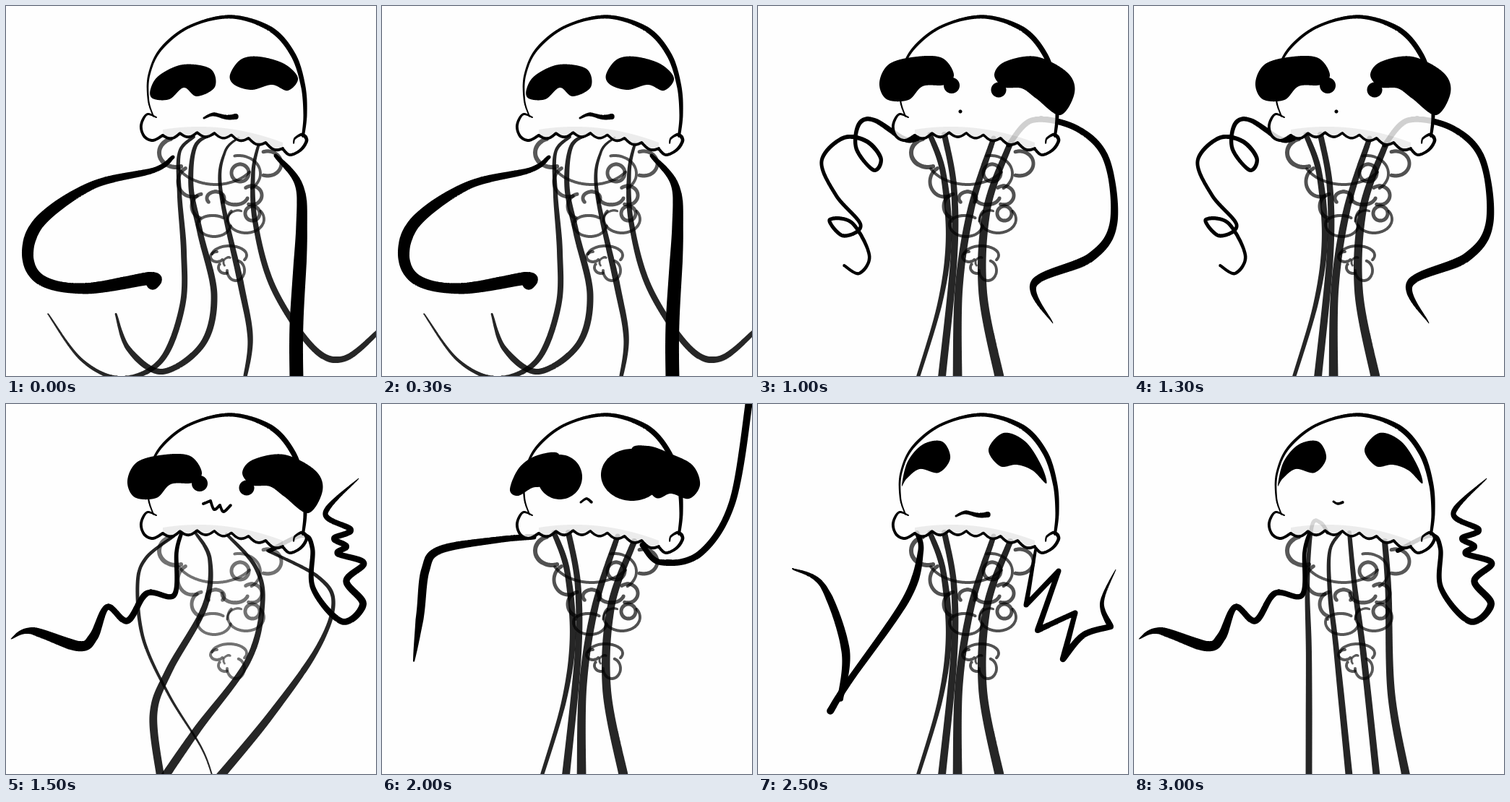
These frames come from a looping animation (512x512 px, 3.5 s). An HTML page with a canvas:

```html
<!DOCTYPE html>
<html lang="en">
<head>
<meta charset="utf-8">
<title>Dancing jellyfish</title>
<style>
html, body { margin: 0; height: 100%; overflow: hidden; background: #fefefe; }
canvas { display: block; width: 512px; height: 512px; }
</style>
</head>
<body>
<canvas id="stage" width="512" height="512"></canvas>
<script>
const ctx = document.getElementById('stage').getContext('2d');
const STEP = 500, TURN = 2 * Math.PI;

// "x,y x,y! ..." -> points; "!" marks a sharp corner
const parse = text => text.replace(/(\S+)!/g, '$1 $1').trim().split(/\s+/)
  .map(point => point.split(',').map(Number));

// Catmull-Rom curve sampled at about half a pixel
function curve(text, closed) {
  const points = parse(text), n = points.length, out = [];
  const at = i => points[closed ? (i + n) % n : Math.max(0, Math.min(n - 1, i))];
  for (let i = 0; i < (closed ? n : n - 1); i++) {
    const [a, b, c, d] = [at(i - 1), at(i), at(i + 1), at(i + 2)];
    const steps = Math.ceil(Math.hypot(c[0] - b[0], c[1] - b[1]) * 2);
    for (let s = 0; s < steps; s++) {
      const t = s / steps;
      out.push(b.map((v, k) => v + t / 2 * (c[k] - a[k] +
        t * (2 * a[k] - 5 * v + 4 * c[k] - d[k] + t * (3 * (v - c[k]) + d[k] - a[k])))));
    }
  }
  return out;
}

// Samples of f(t) for t from 0 to 1
const trace = (f, count = 300) => Array.from({ length: count + 1 }, (_, i) => f(i / count));

// Round brush whose width runs evenly through the given values
function brush(samples, ...widths) {
  const path = new Path2D(), last = widths.length - 1;
  samples.forEach(([x, y], i) => {
    const u = i / samples.length * last, k = Math.floor(u);
    const r = (widths[k] + (u - k) * ((widths[k + 1] ?? widths[k]) - widths[k])) / 2;
    path.moveTo(x + r, y);
    path.arc(x, y, r, 0, TURN);
  });
  return path;
}

const stroke = (text, ...widths) => brush(curve(text), ...widths);

function outline(samples) {
  const path = new Path2D();
  samples.forEach(([x, y]) => path.lineTo(x, y));
  path.closePath();
  return path;
}

const blob = text => outline(curve(text, true));

// Part of an ellipse, from and to given in turns
const arc = (x, y, rx, ry, from = 0, to = 1) => trace(t => {
  const angle = TURN * (from + (to - from) * t);
  return [x + rx * Math.cos(angle), y + ry * Math.sin(angle)];
}, 120);
const lobe = (width, ...shape) => brush(arc(...shape), width, width);
const oval = (x, y, rx, ry = rx) => outline(arc(x, y, rx, ry));

// Bell: dome, two curled flaps and a scalloped hem between them
const hemLine = (t, lift = 0) => [217 + 166 * t, 179 - 27 * t + 45 * t * t - lift];
const hem = trace(t => hemLine(t, -6 * Math.abs(Math.sin(7 * Math.PI * t))));
const dome = curve('411,180 414,150 411,110 397,67 366,32 312,15 255,28 215,59 198,95 197,130 204,153');
const leftFlap = curve('208,154 195,150 187,165 191,180 203,186 217,179');
const rightFlap = curve('383,198 393,206 408,199 416,186 410,178 400,183 398,190');
const body = outline([...leftFlap, ...hem, ...rightFlap, ...dome]);
const frill = outline([...hem, ...trace(t => hemLine(1 - t, 8))]);
const bell = [
  brush(dome, 4, 6, 7, 7, 5, 4, 4, 3, 2),
  brush(leftFlap, 2, 4, 4, 4),
  brush(hem, 4, 3.5, 4),
  brush(rightFlap, 4, 4, 5, 2)
];

const ruffles = [
  lobe(6, 235, 203, 23, 20, .2, .7),
  lobe(4, 290, 205, 58, 42, .1, .42),
  lobe(5, 258, 243, 20, 21, .2, .67),
  lobe(5, 273, 277, 16, 17, .3, .72),
  lobe(4, 288, 302, 23, 17, .02, .55),
  lobe(4, 332, 295, 25, 19, -.1, .6),
  lobe(3, 321, 298, 15, 15, .5, .8),
  lobe(4, 286, 298, 18, 8, .5, .9),
  lobe(4, 322, 232, 30, 25, .72, 1.15),
  lobe(5, 324, 231, 12, 12),
  lobe(5, 362, 218, 19, 17, .7, 1.3),
  lobe(5, 340, 262, 14, 13, .65, 1.3),
  lobe(5, 341, 287, 10, 10),
  lobe(5, 290, 266, 12, 9, .4, 1.1),
  lobe(5, 317, 262, 18, 13, .05, .5),
  lobe(4, 309, 345, 24, 13, .52, 1.08),
  lobe(4, 292, 347, 9, 7, .1, .75),
  lobe(4, 318, 366, 12, 14, .8, 1.5),
  lobe(4, 303, 362, 9, 8, .2, .6),
  lobe(3, 308, 355, 7, 7, .4, .8)
];

const tentacles = {
  sway: [
    stroke('260,181 240,203 240,260 246,340 244,415 215,490 160,515 105,490 58,426', 4, 6, 8, 8, 8, 6, 4, 2),
    stroke('287,177 262,194 256,250 269,315 288,400 272,468 216,506 170,475 152,426', 4, 7, 8, 9, 9, 8, 8, 3),
    stroke('322,182 303,202 297,255 325,385 338,460 330,518', 3, 5, 7, 9, 8, 5),
    stroke('350,190 342,230 345,300 370,390 425,473 468,488 518,448', 4, 7, 8, 8, 9, 6)
  ],
  cross: [
    stroke('232,183 194,213 182,250 190,325 225,402 270,475 286,516', 4, 5, 5, 4, 3, 2),
    stroke('262,178 282,215 275,280 225,370 204,430 214,518', 4, 7, 9, 10, 11, 11),
    stroke('305,180 345,225 355,275 335,355 265,450 218,518', 4, 6, 8, 9, 11, 12),
    stroke('362,203 430,238 453,275 430,340 365,432 294,518', 4, 5, 6, 9, 11, 12)
  ],
  gather: [
    stroke('238,178 256,230 264,320 252,410 220,518', 7, 9, 8, 6, 5),
    stroke('258,178 271,250 271,350 254,518', 8, 9, 10, 11),
    stroke('326,183 295,280 278,390 276,518', 7, 10, 11, 13),
    stroke('349,190 317,280 311,395 335,518', 8, 11, 12, 13)
  ],
  hang: [
    stroke('268,178 258,164 246,170 240,250 242,350 242,518', 5, 6, 8, 9, 9),
    stroke('287,177 271,203 271,260 280,340 298,518', 4, 7, 9, 10),
    stroke('298,178 305,250 318,350 336,518', 6, 9, 10),
    stroke('347,190 352,260 356,400 377,518', 8, 10, 12)
  ]
};

const arms = {
  bend: [
    stroke('231,209 205,227 120,248 48,297 30,345 50,380 110,391 199,377 203,384',
      5, 9, 11, 15, 17, 15, 14, 17, 18),
    stroke('373,207 405,247 409,310 402,440 402,520', 5, 14, 18, 19, 19)
  ],
  curl: [
    stroke(`220,183 202,184 161,158 140,163 136,197 160,227 170,211 150,187 117,183 88,215
      108,262 142,303 118,318 99,296 130,300 154,345 140,370 119,359`, 8, 6, 5, 6, 5, 5, 5, 5, 4),
    stroke('347,192 380,158 440,169 482,212 492,300 460,348 382,384 408,439', 7, 8, 9, 9, 11, 13, 11, 1)
  ],
  wave: [
    stroke('243,178 236,205 233,264 195,262 168,300 140,281 121,322 100,335 35,314 7,325',
      5, 6, 7, 8, 9, 8, 13, 15, 12, 1),
    stroke(`365,203 410,182 424,200 425,255 465,301 494,277 471,245 495,220 459,207 471,197
      454,186 477,174 442,151 488,103`, 6, 6, 7, 8, 10, 9, 8, 8, 7, 1)
  ],
  reach: [
    stroke('210,184 160,188 80,202 60,230 53,290 44,356', 7, 9, 11, 12, 11, 2),
    stroke('360,195 385,219 440,207 485,135 509,-10', 7, 9, 9, 10, 10)
  ],
  zigzag: [
    stroke('220,178 225,205 205,270 125,385 100,425', 6, 11, 10, 9, 10),
    stroke('48,228 90,252 121,340 114,408', 2, 10, 12, 8),
    stroke('384,202 371,278! 416,231! 387,313! 439,289! 422,353! 450,320 488,308! 476,275 495,229',
      4, 7, 7, 8, 7, 9, 8, 1)
  ]
};

const eyes = {
  sleepy: [
    blob('200,115 212,96 245,81 283,87 289,112 264,125 246,113 226,129 203,128'),
    blob('310,95 325,74 350,70 385,80 404,100 390,117 368,109 340,116 316,109')
  ],
  bushy: [
    blob('168,106 182,80 220,70 255,72 271,95 258,109 228,111 208,130 178,129'),
    oval(268, 110, 11),
    blob('327,95 342,77 385,70 428,92 438,120 418,151 385,128 365,114 340,112'),
    oval(333, 116, 10.5)
  ],
  droopy: [
    oval(246, 101, 31),
    blob('177,118 190,88 215,71 245,70 230,110 208,116 188,127'),
    oval(346, 98, 43, 36),
    blob('345,66 368,58 400,69 430,85 440,112 425,131 400,124 375,127')
  ],
  wide: [
    blob('199,113 207,80 228,56 255,52 266,75 250,95 224,90 206,103'),
    blob('319,63 340,40 370,52 392,85 399,110 380,92 358,84 335,86')
  ]
};

const mouths = {
  flat: stroke('274,155 287,150 305,154 318,153', 3, 5, 6, 8),
  open: oval(288, 148, 14, 13),
  speck: oval(280, 146, 2.5),
  wobble: stroke('273,138 283,134! 288,146 296,140! 301,149 311,140', 4, 4),
  frown: stroke('275,136 283,131 290,136', 3, 4),
  smile: stroke('276,135 282,138 289,136', 3, 4)
};

// tentacles, arms, eyes, mouth, ruffle opacity
const poses = [
  ['sway', 'bend', 'sleepy', 'flat', .65],
  ['cross', 'curl', 'sleepy', 'open', .55],
  ['gather', 'curl', 'bushy', 'speck', .68],
  ['cross', 'wave', 'bushy', 'wobble', .55],
  ['gather', 'reach', 'droopy', 'frown', .68],
  ['gather', 'zigzag', 'wide', 'flat', .68],
  ['hang', 'wave', 'wide', 'smile', .65]
];

function paint(paths, color) {
  ctx.fillStyle = color;
  paths.forEach(path => ctx.fill(path));
}

function draw() {
  const index = Math.floor(performance.now() / STEP) % poses.length;
  const [legs, arm, eye, mouth, shade] = poses[index];
  ctx.fillStyle = '#fefefe';
  ctx.fillRect(0, 0, 512, 512);
  paint(ruffles, `rgba(0,0,0,${shade})`);
  paint(tentacles[legs], 'rgba(0,0,0,.85)');
  paint(arms[arm], '#000');
  paint([body], 'rgba(254,254,254,.82)');
  paint([frill], 'rgba(0,0,0,.07)');
  paint([...bell, ...eyes[eye], mouths[mouth]], '#000');
  requestAnimationFrame(draw);
}
draw();
</script>
</body>
</html>
```
